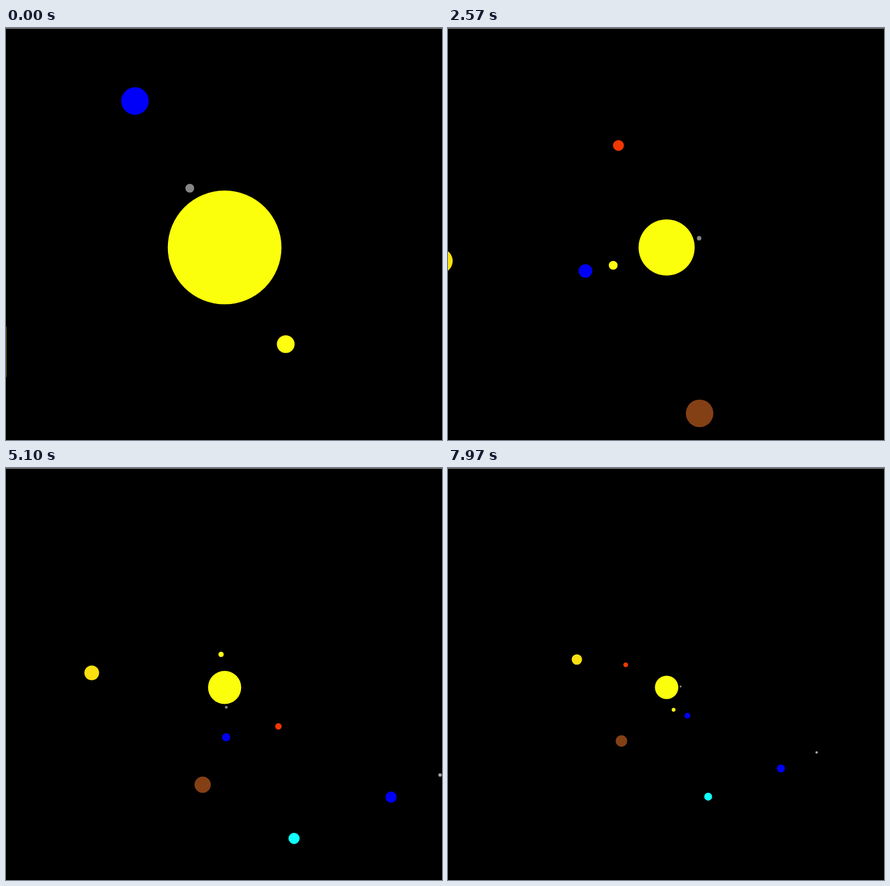
An HTML page with a canvas that plays this animation: 770 px wide and 727 px high, repeating every 8000 ms.

```html
<!DOCTYPE html>
<html lang="en">
<head>
<meta charset="utf-8">
<title>Orbits</title>
<style>
  html, body { margin: 0; width: 100%; height: 100%; overflow: hidden; background: #000; }
  canvas { display: block; }
</style>
</head>
<body>
<canvas id="stage" width="770" height="727"></canvas>
<script>
const ctx = document.getElementById('stage').getContext('2d');
const LOOP = 8, FPS = 30, YEAR = 365.25;
const CX = 386.1, CY = 387.2;

const sun = { orbit: 0, start: 0, days: YEAR, size: 99.2, color: '#fcff0c' };
const planets = [
  { orbit: 120, start: 239.5, days: 87.97, size: 7.5, color: '#858585' },
  { orbit: 200, start: 57.7, days: 224.7, size: 15.3, color: '#fffd10' },
  { orbit: 300, start: 238.5, days: YEAR, size: 23.9, color: '#0000f8' },
  { orbit: 400, start: 93, days: 687, size: 19, color: '#f03800' },
  { orbit: 600, start: 54.7, days: 4333, size: 48.5, color: '#844015' },
  { orbit: 805, start: 166.9, days: 10759, size: 43.7, color: '#fbe010' },
  { orbit: 1000, start: 58.5, days: 30687, size: 33, color: '#10ffff' },
  { orbit: 1200, start: 29.9, days: 60190, size: 33, color: '#0000f8' },
  { orbit: 1400, start: 19.8, days: 90560, size: 9.5, color: '#a4a4a4' }
];

// Ten zoom-out steps at growing intervals: linear at first, then by a fixed ratio.
function zoomAt(t) {
  const step = Math.min(10, Math.floor(2 * (t / 0.69) ** 0.708));
  return step < 5 ? 1.01 - 0.1018 * step : 0.4975 * 0.8385 ** (step - 5);
}

// Simulated years, running slightly faster over time.
const yearsAt = t => (110.6 * t + 0.22 * t * t) / 360;

function drawBody({ orbit, start, days, size, color }, zoom, years) {
  const angle = (start / 360 + years * YEAR / days) * 2 * Math.PI;
  const x = CX + orbit * zoom * Math.cos(angle);
  const y = CY + orbit * zoom * Math.sin(angle);
  const r = size * zoom + 0.2;
  if (x + r < 0) {
    // a body past the left edge is flattened against it
    ctx.fillStyle = '#7c6c0c';
    ctx.fillRect(0, y - r, 1, 2 * r);
    return;
  }
  ctx.fillStyle = color;
  ctx.beginPath();
  ctx.arc(x, y, r, 0, 2 * Math.PI);
  ctx.fill();
}

function draw(t) {
  ctx.fillStyle = '#000';
  ctx.fillRect(0, 0, 770, 727);
  for (const body of [sun, ...planets]) drawBody(body, zoomAt(t), yearsAt(t));
  ctx.fillStyle = '#b4b2aa';
  ctx.fillRect(0, 0, 770, 1);
}

const begin = performance.now();
function frame() {
  const t = (performance.now() - begin) / 1000 % LOOP;
  draw(Math.min(LOOP * FPS - 1, Math.floor((t + 0.004) * FPS)) / FPS);
  requestAnimationFrame(frame);
}
frame();
</script>
</body>
</html>
```
